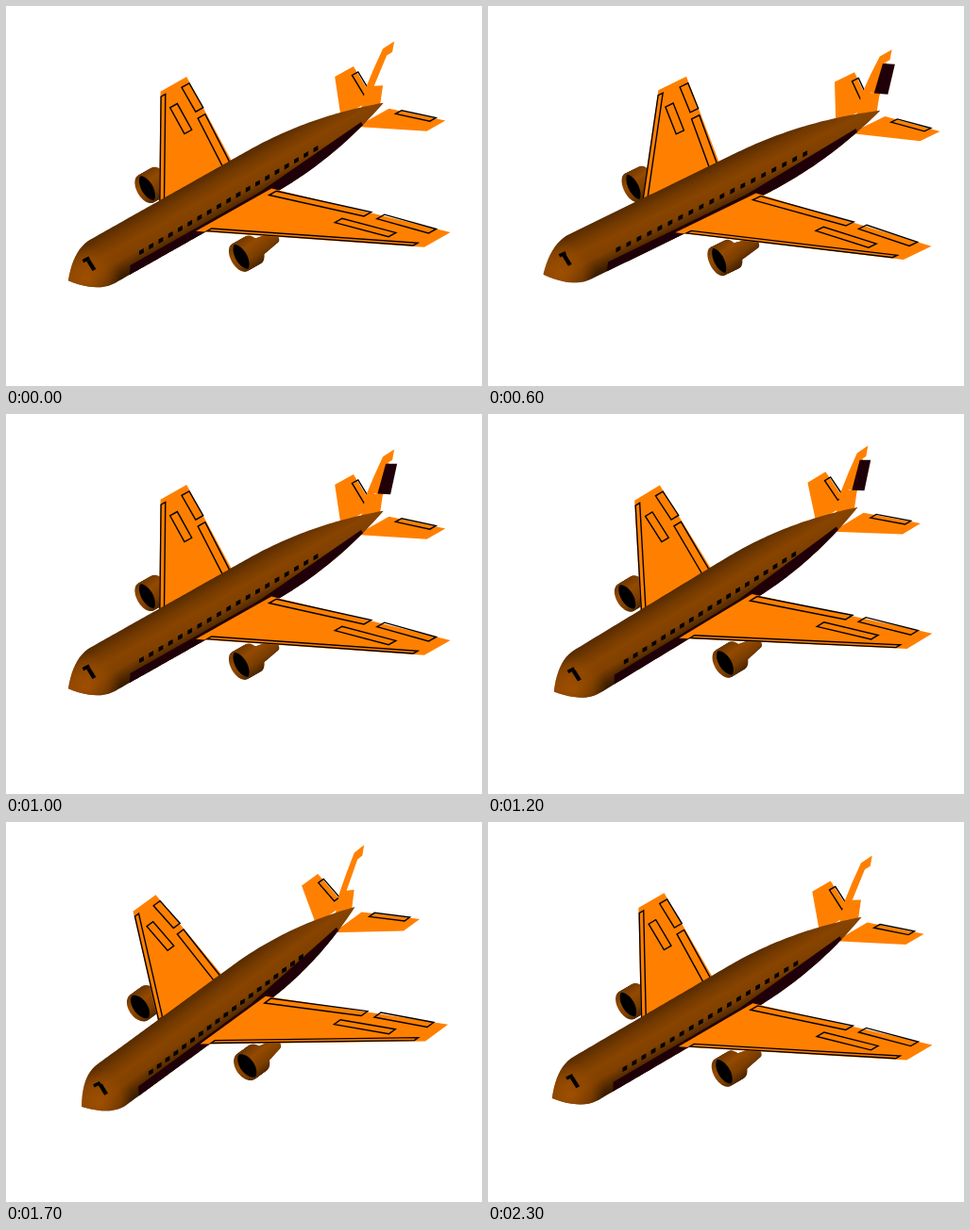
An HTML page with a canvas that plays this animation: 504x403 px, repeating every 2.4 s.

```html
<!DOCTYPE html>
<html lang="en">
<head>
<meta charset="utf-8">
<title>Yawing airliner</title>
<style>
  html, body { margin: 0; width: 100%; height: 100%; overflow: hidden; background: #fff; }
  canvas { display: block; }
</style>
</head>
<body>
<canvas id="stage" width="504" height="403"></canvas>
<script>
const ctx = document.getElementById('stage').getContext('2d');
const LOOP = 2400, STEP = 100, HALF = LOOP / 2, TURN = 500;
const MIN_YAW = 39.1, SWING = 12.6, MID_YAW = 44.3;
const LENGTH = 467, SPAN = 398, TILT = 0.578, RISE = 0.816;
const PIVOT = { x: 171, y: 230.2, at: 0.317 };
const ORANGE = '#ff8000', MAROON = '#200008';

// Lifting surfaces: leading and trailing edges are given at the tip, with their sweep.
const WING = { mid: 0.055, root: 0.07, tip: 0.502, lead: 0.667, leadSweep: 0.843, trail: 0.75, trailSweep: 0.48, bow: 15 };
const STABILISER = { mid: 0.004, root: 0.03, tip: 0.175, lead: 0.99, leadSweep: 0.7, trail: 1.049, trailSweep: 0.4, bow: 0 };

let nose, along, across, sag;

// Yaw swings evenly back and forth.
function yawAt(t) {
  const phase = ((t - TURN + LOOP) % LOOP) / HALF;
  return MIN_YAW + SWING * (1 - Math.abs(1 - phase));
}

function setPose(yaw) {
  const off = yaw - MID_YAW, a = yaw * Math.PI / 180;
  const span = SPAN - 0.7 * off;
  along = [LENGTH * Math.cos(a), -LENGTH * TILT * Math.sin(a)];
  across = [span * Math.sin(a), span * TILT * Math.cos(a) - 0.5 * off];
  nose = [PIVOT.x - PIVOT.at * along[0], PIVOT.y - PIVOT.at * along[1]];
  sag = 0.45 * off;
}

// p runs from nose to tail, q across the span, lift is upwards in pixels.
function at(p, q, lift = 0) {
  return [nose[0] + p * along[0] + q * across[0], nose[1] + p * along[1] + q * across[1] - lift];
}

function trace(pts) {
  ctx.beginPath();
  pts.forEach(p => ctx.lineTo(...p));
  ctx.closePath();
}

function fill(pts, paint) {
  trace(pts);
  ctx.fillStyle = paint;
  ctx.fill();
}

function gradient(x0, y0, x1, y1, colors) {
  const g = ctx.createLinearGradient(x0, y0, x1, y1);
  colors.forEach((c, i) => g.addColorStop(i / (colors.length - 1), c));
  return g;
}

// Surface helpers: side is 1 for the near half, -1 for the far half.
function onSurface(s, side, edge, h, offset = 0) {
  const p = s[edge] - s[edge + 'Sweep'] * (s.tip - h) + offset;
  return at(p, s.mid + side * h, s.bow * (1 - (h / s.tip) ** 2));
}

function surface(s, side) {
  fill([['lead', s.root], ['lead', s.tip], ['trail', s.tip], ['trail', s.root]]
    .map(([edge, h]) => onSurface(s, side, edge, h)), ORANGE);
}

function panel(s, side, edge, h0, h1, o0, o1) {
  trace([[h0, o0], [h1, o0], [h1, o1], [h0, o1]].map(([h, o]) => onSurface(s, side, edge, h, o)));
  ctx.strokeStyle = '#000';
  ctx.lineWidth = 1.4;
  ctx.stroke();
}

function wing(side) {
  surface(WING, side);
  panel(WING, side, 'lead', 0.09, 0.48, 0.002, 0.016);
  panel(WING, side, 'trail', 0.087, 0.316, -0.03, -0.007);
  panel(WING, side, 'trail', 0.345, 0.47, -0.027, -0.003);
  panel(WING, side, 'trail', 0.286, 0.416, -0.083, -0.06);
}

function stabiliser(side) {
  surface(STABILISER, side);
  panel(STABILISER, side, 'trail', 0.06, 0.148, -0.016, 0.003);
}

function fin(rudder) {
  const upright = ([p, lift]) => at(p, 0, lift);
  fill([[0.931, 6], [0.946, 25], [0.972, 41], [1, 56], [1.036, 57], [1.03, 47], [1.012, 46.5],
    [0.972, 22], [1, 17], [0.991, -2]].map(upright), ORANGE);
  if (!rudder) return;
  fill([[0.968, 24], [1.009, 47], [1.02, 46], [1, 15]].map(upright), ORANGE);
  fill([[1.009, 47], [1.045, 40], [1.024, 11.5], [0.983, 20]].map(upright), MAROON);
}

// Circle facing forward, seen from the viewpoint.
function ring([cx, cy], r) {
  return Array.from({ length: 48 }, (_, i) => {
    const c = r * Math.cos(i * Math.PI / 24), s = r * Math.sin(i * Math.PI / 24);
    return [cx + c * across[0] / SPAN, cy + c * across[1] / SPAN - s * RISE];
  });
}

function tube(p0, p1, q, r0, r1, paint) {
  for (let k = 1; k >= 0; k -= 0.05) {
    fill(ring(at(p0 + (p1 - p0) * k, q), r0 + (r1 - r0) * k), paint);
  }
}

function engine(p, q) {
  const [x, y] = at(p, q);
  const paint = gradient(x - 4, y - 18, x + 19, y + 12, ['#6a3500', '#944a00', '#7a3d00', '#3a1c00']);
  tube(p + 0.06, p + 0.115, q, 10, 6, paint);
  tube(p, p + 0.046, q, 16.5, 16.5, paint);
  ctx.save();
  trace(ring([x, y], 15.5));
  ctx.clip();
  fill(ring(at(p + 0.014, q), 15.5), '#000');
  ctx.restore();
}

// Half width of the hull: rounded nose, straight middle, tapering tail.
function halfWidth(s) {
  const bulge = x => 1 - (1 - Math.min(x, 1)) ** 2;
  return 26.5 * bulge(s / 0.11) * bulge((1 - s) / 0.39);
}

function fuselage() {
  const len = Math.hypot(...along), n = 100;
  ctx.save();
  ctx.translate(...nose);
  ctx.rotate(Math.atan2(along[1], along[0]));
  ctx.translate(0, 1.5);

  const side = sign => Array.from({ length: n + 1 }, (_, i) => [i / n * len, sign * halfWidth(i / n)]);
  trace([...side(-1), ...side(1).reverse()]);
  ctx.clip();
  ctx.fillStyle = gradient(0, -27, 0, 31, ['#552a00', '#743a00', '#884400', '#804000', '#4c2600', '#241000']);
  ctx.fillRect(0, -30, len, 60);

  const glow = ctx.createRadialGradient(18, 8, 2, 18, 8, 36);
  glow.addColorStop(0, 'rgba(160,80,0,.9)');
  glow.addColorStop(0.6, 'rgba(148,74,0,.6)');
  glow.addColorStop(1, 'rgba(136,68,0,0)');
  ctx.fillStyle = glow;
  ctx.fillRect(0, -30, 60, 60);

  fill([[0.17, 18], [0.58, 18], [0.92, 6], [0.92, 30], [0.15, 30]].map(([s, d]) => [s * len, d]), MAROON);
  ctx.restore();
}

// Black parallelogram around a centre, from two half edges.
function pane([x, y], [ax, ay], [bx, by]) {
  fill([[-1, -1], [1, -1], [1, 1], [-1, 1]].map(([i, j]) => [x + i * ax + j * bx, y + i * ay + j * by]), '#000');
}

function windows() {
  const count = 19;
  for (let i = 0; i < count; i++) {
    const k = i / (count - 1);
    pane(at(0.157 + 0.565 * k, 0.093 - 0.015 * k, 15), [2.4, -1.3], [0, 2.3]);
  }
  pane(at(0.059, 0, 10), [3.4, -1.7], [0.8, 1.6]);
  pane(at(0.052, 0.028, 10), [1.9, -1], [3.2, 5.2]);
}

function draw(t) {
  setPose(yawAt(t));
  ctx.fillStyle = '#fff';
  ctx.fillRect(0, 0, 504, 403);
  engine(0.373, -0.153);
  wing(-1);

  ctx.save();
  ctx.translate(0, sag);
  stabiliser(-1);
  fin(t >= TURN && t < TURN + HALF);
  stabiliser(1);
  fuselage();
  windows();
  ctx.restore();

  engine(0.337, 0.248);
  wing(1);
}

const start = performance.now();
function tick() {
  const t = (performance.now() - start) % LOOP;
  draw(Math.floor(t / STEP) * STEP);
  requestAnimationFrame(tick);
}
tick();
</script>
</body>
</html>
```
